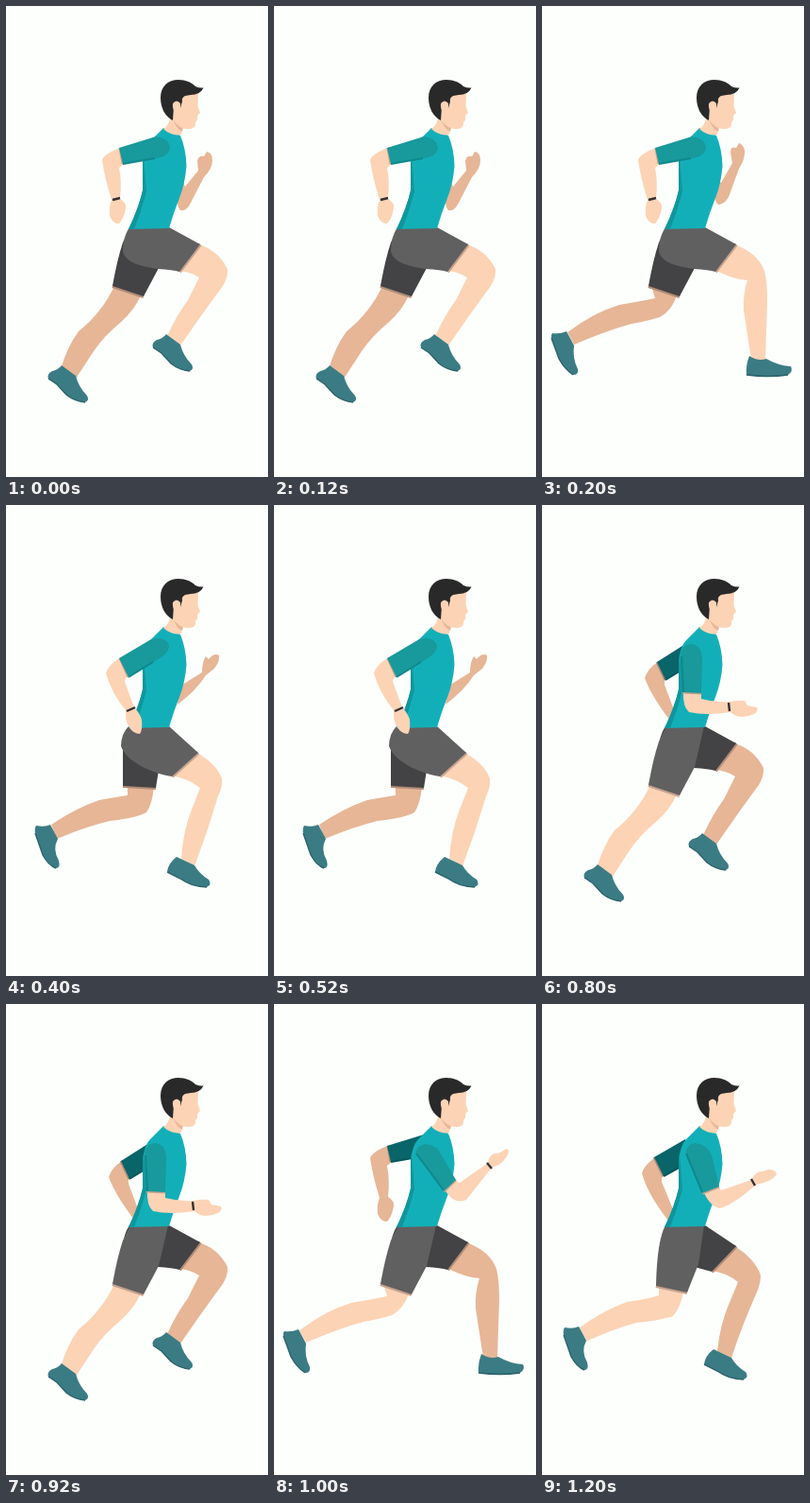
Write an HTML page that moves like this. It is 278 px wide and 498 px high and loops after 1400 ms.

```html
<!DOCTYPE html>
<html lang="en">
<head>
<meta charset="utf-8">
<title>Runner</title>
<style>
  html, body { margin: 0; width: 100%; height: 100%; overflow: hidden; background: #fdfffc; }
  svg { display: block; width: 100%; height: 100%; }
</style>
</head>
<body>
<svg id="stage" viewBox="0 0 278 498"></svg>
<script>
const STEP = 200;
const near = { skin: '#fcd3b5', fold: '#c7a38d', shorts: '#616061', sleeve: '#18999c', edge: '#0f888b' };
const far = { skin: '#e6b697', fold: '#b08c78', shorts: '#434244', sleeve: '#096569', edge: '#08585b' };
const shirt = '#13afb8', shirtShade = '#0f969d', shoeFill = '#3b7c84', soleLine = '#2b626b', hair = '#2a292a';

// Shoes: the sole runs first, the upper closes the shape.
const shoes = {
  tilt: ['M156 361L165 367L175 378Q184 385 195 386', 'Q200 384 197 379Q188 370 185 358L170 347Q166 352 160 353Q154 356 156 361Z'],
  slope: ['M171 388L185 395Q197 404 213 404', 'Q219 401 215 396Q205 390 200 381L181 372Q172 379 171 388Z'],
  flat: ['M217 390Q240 393 261 390', 'Q267 386 264 381Q250 380 238 373Q229 376 220 370Q216 380 217 390Z'],
  toe: ['M31 347L39 370Q45 381 53 384', 'Q58 384 56 376Q49 364 55 353L47 338Q41 341 32 339Q30 342 31 347Z'],
  kick: ['M10 351L18 373Q24 384 33 390', 'Q39 390 38 384Q32 372 34 359L26 344Q19 347 11 346Q9 348 10 351Z']
};

const frontHigh = 'M131 234L173 234L206 252L184 281Q177 279 161 278C142 275 126 271 124 259Q124 244 131 234Z';
const backHem = 'M132 234L172 234L162 277L146 307L113 296Q118 268 124 250Z';

const leg = (cloth, hem, skin, shoe, shift = '0 0') => ({ cloth, hem, skin, shoe, shift });

const front = {
  lift: leg(frontHigh, 'M206 252L184 281',
    'M204 252Q225 258 235 278Q236 286 230 296Q216 315 206 329L185 359L171 349Q181 327 193 311L205 287Q196 281 183 280Z', 'tilt'),
  land: leg(frontHigh, 'M206 252L184 281',
    'M204 252Q229 261 236 280Q239 292 239 312L237 375L222 374L214 322Q213 305 218 290Q205 290 183 279Z', 'flat'),
  press: leg('M130 234L173 234L204 262L176 287C152 283 128 271 122 255Q122 242 130 234Z', 'M204 262L176 287',
    'M202 262Q222 272 229 289Q230 298 225 308Q214 345 200 382L186 374Q188 344 197 322L206 299Q193 289 175 286Z', 'slope'),
  under: leg('M128 234L173 234Q182 241 188 254L200 279L165 296C150 289 127 275 121 258Q121 244 128 234Z', 'M200 279L165 296',
    'M198 279Q212 296 215 314Q213 323 206 331Q182 361 164 391L150 381Q156 358 168 342L188 317Q180 305 166 295Z', 'tilt', '-20.5 32'),
  reach: leg('M160 234L173 234L206 256L180 283L158 277Z', 'M206 256L180 283',
    'M204 256Q226 269 232 287Q232 296 227 307Q213 338 201 374L186 367Q189 339 198 318L208 294Q196 284 179 282Z', 'slope', '1 -7')
};

const back = {
  push: leg(backHem, 'M113 296L146 307',
    'M115 296L143 306Q136 322 121 335Q104 349 93 365L74 394L58 384Q65 360 77 344Q102 324 115 296Z', 'tilt', '-111 33'),
  kick: leg(backHem, 'M113 296L146 307',
    'M116 296L143 306Q138 322 125 329Q112 333 95 336Q69 343 34 358L27 345Q55 324 82 316Q106 312 120 309Z', 'kick'),
  trail: leg('M124 252L164 268L159 299L124 297Z', 'M124 297L159 299',
    'M129 297L157 298Q155 317 149 325Q139 331 110 334Q85 340 54 353L48 338Q75 320 99 312Q116 309 129 307Z', 'toe'),
  fold: leg('M122 254L166 270L165 294L125 295Z', 'M125 295L165 294',
    'M131 294L158 293Q157 312 150 321Q140 327 115 332Q88 342 60 356L53 342Q78 322 100 313Q118 309 132 304Z', 'toe', '5 2.5'),
  swing: leg('M131 234L172 234L166 275L154 305L121 298Q122 250 131 234Z', 'M121 298L154 305',
    'M124 298L150 304Q147 321 139 330Q124 335 100 337Q75 344 46 357L40 342Q65 324 90 315Q112 312 124 308Z', 'toe', '-8 3')
};

// Each arm: skin, sleeve, cuff line, shaded sleeve edge, wristband.
const arm = (skin, sleeve = '', cuff = '', edge = '', band = '') => ({ skin, sleeve, cuff, edge, band });

const arms = {
  hang: arm('M123 149L126 166L120 171Q123 186 121 204Q128 208 127 214Q125 225 120 230Q114 231 110 222Q109 212 112 205Q105 183 102 163Q104 156 123 149Z',
    'M120 150L159 138Q174 140 174 151Q171 160 159 161L124 167Z', 'M121 150L124 167', 'M124 167L158 161', 'M113 205L121 203'),
  bent: arm('M122 161L130 180Q126 183 126 187L136 214Q142 220 144 227Q145 238 142 242Q135 242 130 234Q126 226 127 217Q112 199 106 178Q108 169 122 161Z',
    'M120 162L154 142Q170 138 173 149Q173 157 160 164L130 182Z', 'M121 162L130 182', 'M130 182L156 166', 'M128 218L137 214'),
  low: arm('M125 169L136 184Q134 187 135 191L150 216Q158 221 161 230Q165 238 161 244Q153 242 147 235Q143 228 144 222Q123 205 113 186Q115 177 125 169Z',
    'M124 168L154 145Q170 140 173 150Q173 157 162 163L137 185Z', 'M124 168L137 185', 'M137 185L158 167', 'M143 222L151 217'),
  tuck: arm('M123 166L132 183Q129 186 130 190L142 222L136 228Q116 202 109 183Q112 173 123 166Z',
    'M122 166L152 147L160 166L131 185Z', 'M122 166L131 185', 'M131 185L149 174'),
  tuckHigh: arm('M121 162L130 180Q126 184 127 188L141 222L134 229Q112 201 106 179Q108 170 121 162Z',
    'M119 162L152 143L160 164L129 182Z', 'M119 162L129 182', 'M129 182L149 171'),
  level: arm('M150 197L169 197L169 205Q184 209 200 208Q207 206 215 207L218 212L228 214Q230 218 225 221Q209 228 200 219Q174 223 156 219Q149 213 150 197Z',
    'M147 163Q147 147 159 147Q170 149 170 164L169 199L149 198Z', 'M149 198L169 199', 'M148 160L150 198', 'M198 209L199 218'),
  raise: arm('M182 198L193 187L197 189L227 168Q228 159 235 158L238 158L247 153Q251 155 247 161Q242 170 231 173L204 207Q196 211 188 205Z',
    'M151 160Q149 150 161 148Q173 149 178 160L193 186L180 198Z', 'M180 198L193 186', 'M151 158L180 197', 'M226 168L231 174'),
  forward: arm('M171 198L187 193L190 197L222 186Q226 177 234 177L240 175Q248 175 249 180Q244 188 227 191Q205 211 189 216Q179 215 171 198Z',
    'M153 160Q152 149 162 147Q175 148 180 160L188 193L170 200Z', 'M170 200L188 193', 'M153 158L170 199', 'M222 185L226 192'),
  fist: arm('M188 186L183 196Q180 211 185 216Q191 218 196 208L210 181Q219 172 219 163Q219 155 213 154L210 159Q204 158 203 164L204 174L190 191Z'),
  fistHigh: arm('M188 184L184 194Q182 207 187 210Q193 210 198 202L209 172Q216 161 215 152Q213 146 209 145L206 150Q200 148 200 155L202 166L190 187Z'),
  open: arm('M184 192L208 177Q208 166 212 160L215 163Q221 156 226 159Q227 165 221 173L212 180Q202 196 182 211Z'),
  openLow: arm('M184 192L211 176Q213 166 217 162L219 166Q226 161 229 165Q230 171 221 179L212 183Q200 196 181 207Z')
};

const poses = [
  { nearLeg: front.lift, farLeg: back.push, nearArm: arms.hang, farArm: arms.fist },
  { nearLeg: front.land, farLeg: back.kick, nearArm: arms.hang, farArm: arms.fistHigh },
  { nearLeg: front.press, farLeg: back.trail, nearArm: arms.bent, farArm: arms.open },
  { nearLeg: front.under, farLeg: back.fold, nearArm: arms.low, farArm: arms.openLow },
  { nearLeg: back.push, farLeg: front.lift, nearArm: arms.level, farArm: arms.tuck },
  { nearLeg: back.kick, farLeg: front.land, nearArm: arms.raise, farArm: arms.hang },
  { nearLeg: back.swing, farLeg: front.reach, nearArm: arms.forward, farArm: arms.tuckHigh }
];

const fill = (d, color) => `<path d="${d}" fill="${color}"/>`;
const line = (d, color, width) => `<path d="${d}" fill="none" stroke="${color}" stroke-width="${width}"/>`;

function drawShoe(name, shift) {
  const [sole, upper] = shoes[name];
  return `<g transform="translate(${shift})">${fill(sole + upper, shoeFill)}${line(sole, soleLine, 1.4)}</g>`;
}

function drawLeg(l, tone) {
  return fill(l.skin, tone.skin) + drawShoe(l.shoe, l.shift) + line(l.hem, tone.fold, 4) + fill(l.cloth, tone.shorts);
}

function drawArm(a, tone, showBand) {
  let out = fill(a.skin, tone.skin);
  if (a.sleeve) out += line(a.cuff, tone.fold, 3) + fill(a.sleeve, tone.sleeve) + line(a.edge, tone.edge, 2);
  if (showBand && a.band) out += line(a.band, '#333133', 2.4);
  return out;
}

const torso =
  fill('M167 129Q177 133 185 137Q191 151 191.5 169Q190 188 184 203Q178 218 173 235L130 236Q141 213 145 195L145 165Q147 149 153 143Z', shirt) +
  fill('M146 158L149 196Q144 216 136 236L130 236Q141 213 145 195L145 165Z', shirtShade);

const head =
  fill('M174 118L187 128L186 136Q176 138 167 130Q173 126 174 118Z', near.skin) +
  fill('M177 119L188 128L187 133Q180 129 177 119Z', far.skin) +
  fill('M178 98L188 93L204 92L203.5 106L206 113L203 116Q204 121 201 123Q202 130 194 130Q183 130 177 120Z', near.skin) +
  fill('M177 121C169 117 164 108 164 97C164 85 172 78 183 78C191 78 197 81 201 85Q205 87 209.5 86.5Q206 94 196 94L190 95Q186 97 187 101L185 108L182 101L178 107Z', hair) +
  fill('M177 103Q181 98 185 103Q186 110 181 114Q176 110 177 103Z', near.skin);

const stage = document.getElementById('stage');
let shown = -1;

function render(time) {
  const index = Math.floor(time / STEP) % poses.length;
  if (index === shown) return;
  shown = index;
  const p = poses[index];
  stage.innerHTML =
    drawArm(p.farArm, far, false) +
    drawLeg(p.farLeg, far) +
    drawLeg(p.nearLeg, near) +
    torso + head +
    drawArm(p.nearArm, near, true);
}

const start = performance.now();
function tick() {
  render(performance.now() - start);
  requestAnimationFrame(tick);
}
tick();
</script>
</body>
</html>
```
